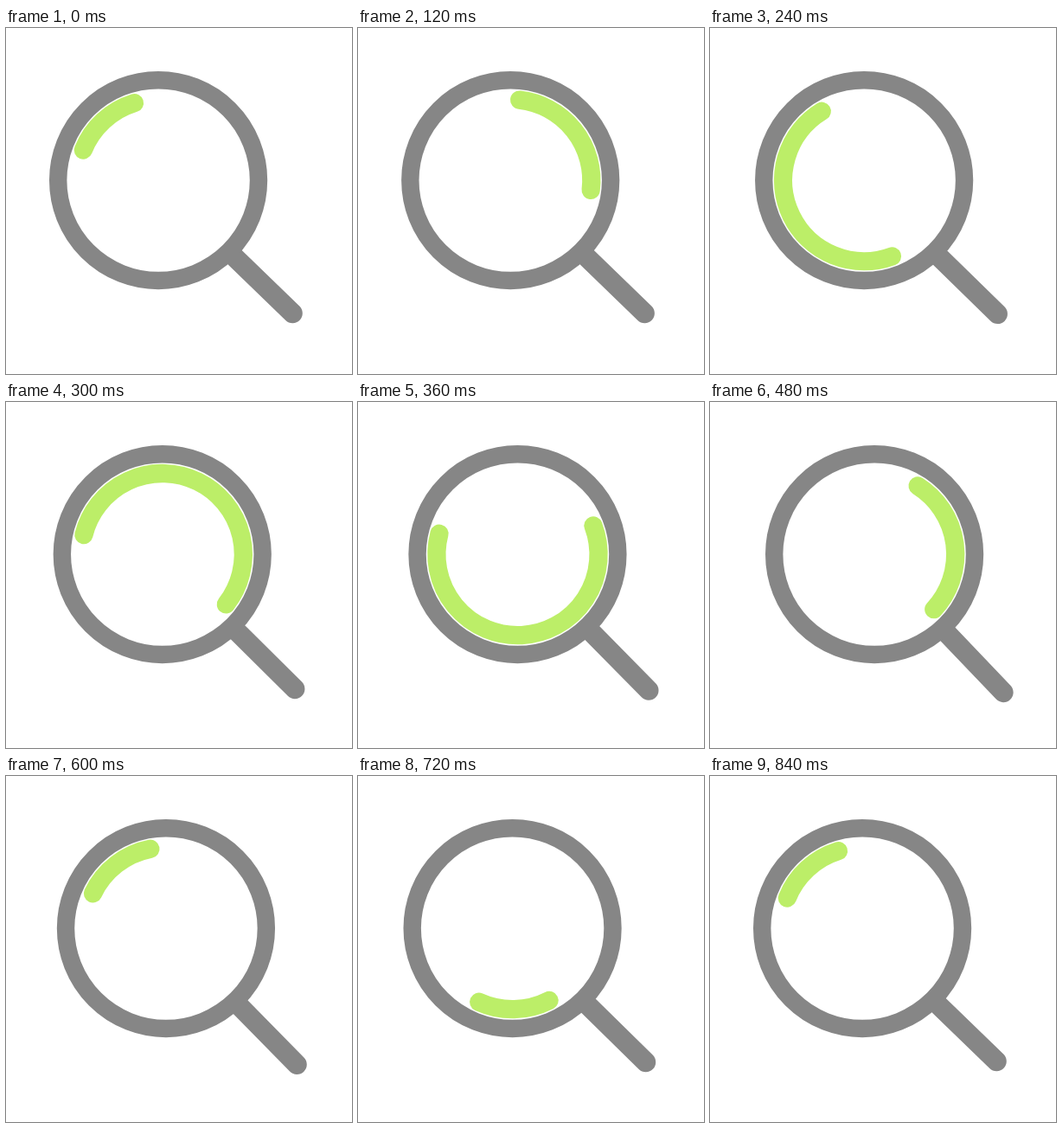
Write an HTML page that moves like this. It is 400 by 400 pixels and loops after 4.37 s.

```html
<!DOCTYPE html>
<html lang="en">
<head>
<meta charset="utf-8">
<title>Search</title>
<style>
  html, body { margin: 0; width: 100%; height: 100%; overflow: hidden; background: #fff; }
  svg { display: block; width: 100%; height: 100%; }
</style>
</head>
<body>
<svg viewBox="0 0 400 400" fill="none" stroke-linecap="round">
  <g id="lens">
    <line id="handle" x1="86" y1="86.6" x2="155.2" y2="153.6" stroke="#868686" stroke-width="23"/>
    <circle r="115.9" stroke="#868686" stroke-width="20.4"/>
    <path id="glint" stroke="#bcee68" stroke-width="21.3"/>
  </g>
</svg>
<script>
const LOOP = 4370, ACTIVE = 840, STEP = 30, KNOT = 120;
const PEAK = 480, SWAY = 14, TILT = 2.25, RADIUS = 93.6;

// Angles of both ends of the glint in degrees, one knot per 120 ms.
const tail = [-158, -83.6, 69.8, 339.2, 662.3, 925.5, 1143, 1282];
const head = [-107.2, 6.9, 238.5, 554.8, 762.8, 978.9, 1194.5, 1332.8];

const [lens, handle, glint] = ['lens', 'handle', 'glint'].map(id => document.getElementById(id));

// Catmull-Rom curve that starts and ends at rest.
function curve(knots, t) {
  const last = knots.length - 1;
  const i = Math.min(Math.floor(t / KNOT), last - 1);
  const u = t / KNOT - i;
  const a = knots[i], b = knots[i + 1];
  const slopeA = i > 0 ? (b - knots[i - 1]) / 2 : 0;
  const slopeB = i + 1 < last ? (knots[i + 2] - a) / 2 : 0;
  return a + u * (slopeA + u * (3 * (b - a) - 2 * slopeA - slopeB
    + u * (2 * (a - b) + slopeA + slopeB)));
}

const cosEase = u => (1 - Math.cos(Math.PI * u)) / 2;

function sway(t) {
  return t < PEAK
    ? cosEase((t / PEAK) ** 2)
    : 1 - cosEase(((t - PEAK) / (ACTIVE - PEAK)) ** 0.8);
}

function point(degrees) {
  const a = degrees * Math.PI / 180;
  return `${(RADIUS * Math.cos(a)).toFixed(2)} ${(RADIUS * Math.sin(a)).toFixed(2)}`;
}

function render(time) {
  const t = Math.min(Math.floor((time % LOOP) / STEP) * STEP, ACTIVE);
  const s = sway(t), from = curve(tail, t), to = curve(head, t);
  lens.setAttribute('transform', `translate(${176.1 + SWAY * s} 176.1)`);
  handle.setAttribute('transform', `rotate(${TILT * s})`);
  glint.setAttribute('d',
    `M${point(from)}A${RADIUS} ${RADIUS} 0 ${to - from > 180 ? 1 : 0} 1 ${point(to)}`);
}

const start = performance.now();
function tick() {
  render(performance.now() - start);
  requestAnimationFrame(tick);
}
tick();
</script>
</body>
</html>
```
